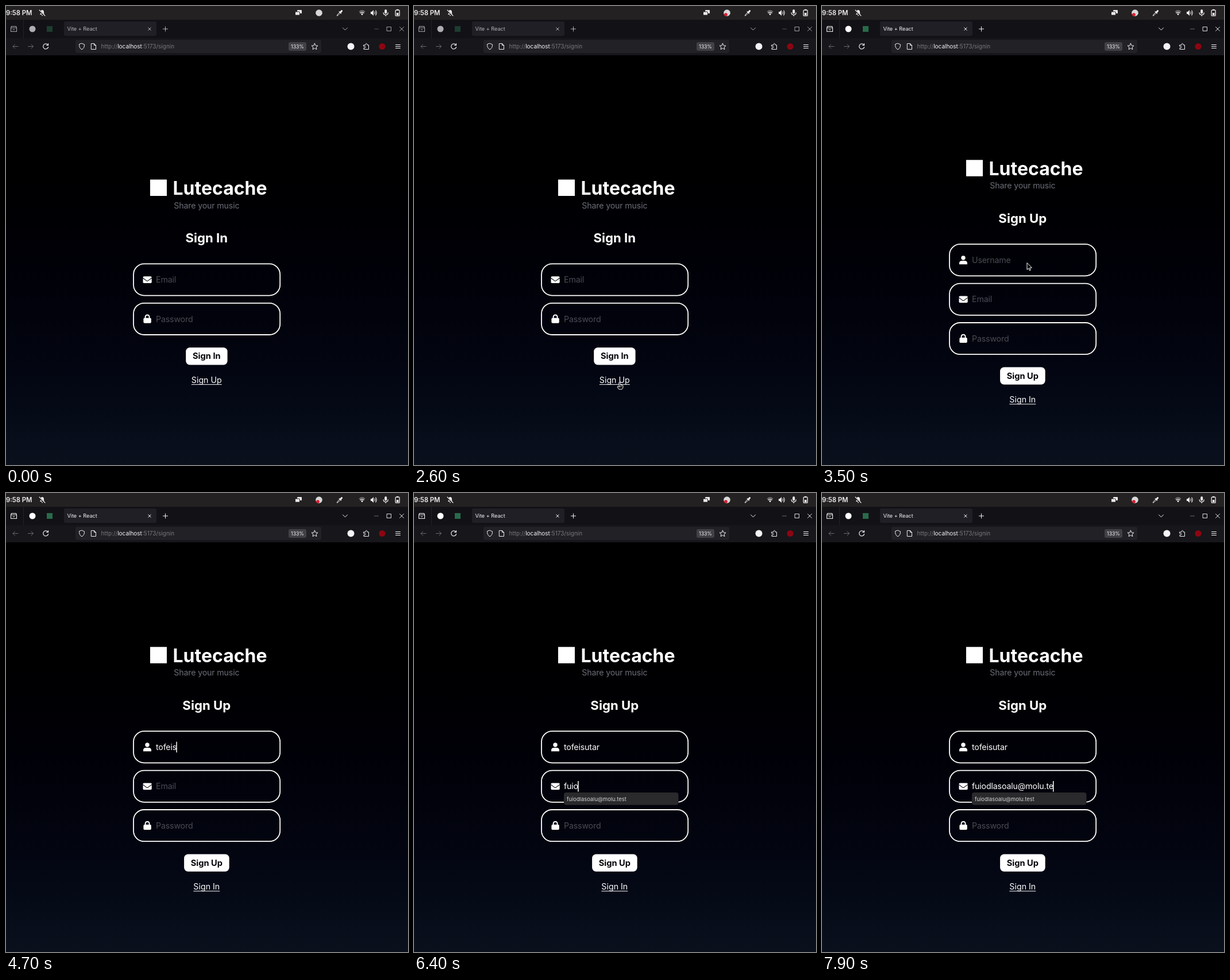
These frames come from a looping animation (700 by 800 pixels, 8000 ms). An HTML page with a canvas:

```html
<!DOCTYPE html>
<html lang="en">
<head>
<meta charset="utf-8">
<title>Sign up walkthrough</title>
<style>
  html, body { margin: 0; width: 100%; height: 100%; overflow: hidden; background: #000; }
  canvas { display: block; }
</style>
</head>
<body>
<canvas id="stage" width="700" height="800"></canvas>
<script>
const ctx = document.getElementById('stage').getContext('2d');
const LOOP = 8000, STEP = 100;
const FONT = 'Inter, "Noto Sans", sans-serif';
const WHITE = '#fff', HINT = '#4a4b54';
const BASE = 14.22, TIGHT = '-0.17px', FIELD_GAP = 68.4;

const BRAND = 'Lutecache';
const USERNAME = 'tofeisutar';
const EMAILS = ['fuiodlasoalu@molu.test', 'fotaunliubdes4718@molu.test'];

// [time, characters visible]
const NAME_KEYS = [[3800, 1], [3900, 2], [4000, 3], [4100, 4], [4300, 7], [4700, 6],
  [4800, 5], [4900, 7], [5100, 8], [5200, 9], [5300, 10]];
const EMAIL_KEYS = [[6100, 1], [6300, 2], [6400, 4], [6500, 5], [6700, 6], [6800, 7],
  [6900, 8], [7000, 9], [7100, 10], [7200, 12], [7300, 13], [7500, 14], [7600, 16],
  [7700, 17], [7800, 19], [7900, 20]];
// [time, x, y]
const POINTER_KEYS = [[600, 350, 671], [900, 325, 558], [1200, 311, 477.5], [1600, 311, 477.5],
  [1700, 311, 477], [1800, 311, 477], [2600, 358, 656], [2700, 358, 655],
  [3500, 357, 448], [3600, 356, 447]];

const clamp01 = v => Math.max(0, Math.min(1, v));
const smooth = v => v * v * (3 - 2 * v);

function rounded(x, y, w, h, r, fill, stroke, width = 1) {
  ctx.beginPath();
  ctx.roundRect(x, y, w, h, r);
  if (fill) { ctx.fillStyle = fill; ctx.fill(); }
  if (stroke) { ctx.strokeStyle = stroke; ctx.lineWidth = width; ctx.stroke(); }
}

function disc(x, y, r, fill) {
  rounded(x - r, y - r, 2 * r, 2 * r, r, fill);
}

function text(str, x, y, size, color, { weight = 400, align = 'left', tracking = '0px' } = {}) {
  ctx.font = `${weight} ${size}px ${FONT}`;
  ctx.letterSpacing = tracking;
  ctx.textAlign = align;
  ctx.fillStyle = color;
  ctx.fillText(str, x, y);
  return ctx.measureText(str).width;
}

// Draws an SVG path placed at x, y.
function icon(d, x, y, { fill, stroke, width = 1.1 } = {}) {
  const path = new Path2D(d);
  ctx.save();
  ctx.translate(x, y);
  ctx.lineCap = ctx.lineJoin = 'round';
  if (fill) { ctx.fillStyle = fill; ctx.fill(path); }
  if (stroke) { ctx.strokeStyle = stroke; ctx.lineWidth = width; ctx.stroke(path); }
  ctx.restore();
}

const outline = (d, x, y, stroke, width) => icon(d, x, y, { stroke, width });
const solid = (d, x, y, fill) => icon(d, x, y, { fill });

function typed(str, keys, t) {
  const passed = keys.filter(k => k[0] <= t);
  return passed.length ? str.slice(0, passed.at(-1)[1]) : '';
}

function systemBar(t) {
  ctx.fillStyle = '#232121';
  ctx.fillRect(0, 0, 700, 24);
  const c = '#efefef';
  text('9:58 PM', 0, 15.8, 11.3, c, { weight: 600 });
  solid('M-4 3 Q-3 2 -3 -1 Q-3 -5 0 -5 Q3 -5 3 -1 Q3 2 4 3 Z M-1.5 4 H1.5 Q0 6.5 -1.5 4 Z', 63, 12, c);
  outline('M-5 -5 L5 5', 62.5, 12.5, '#232121', 2.6);
  outline('M-5 -5 L5 5', 63, 12, c, 1.1);
  rounded(507, 7, 8, 6, 1, c);
  rounded(503.5, 10, 8, 6, 1, c, '#232121', 1);
  disc(545, 12, 5.8, '#d8d8d8');
  if (t >= 300) disc(543, 15, 2.8, '#e0182d');
  outline('M-4.5 4.8 L-3.8 2.8 L0 -1 L1.2 .2 L-2.6 4 Z', 581, 12, c, 1);
  outline('M-.6 -2.2 L2.4 .8', 581, 12, c, 1.5);
  outline('M1.8 -1.4 L3.6 -3.4', 581, 12, c, 3);
  outline('M-4.5 -2 Q0 -6 4.5 -2', 620, 12, '#888', 1.4);
  outline('M-3 0 Q0 -2.5 3 0', 620, 12, c, 1.6);
  solid('M-2 1.5 Q0 0 2 1.5 L0 4.5 Z', 620, 12, c);
  solid('M-6 -2 H-4 L-1 -5 V5 L-4 2 H-6 Z', 641, 12, c);
  outline('M1 -2 Q2.5 0 1 2 M2.8 -4 Q5.5 0 2.8 4', 641, 12, c, 1.2);
  rounded(659.2, 6, 4, 7.5, 2, c);
  outline('M-4 0 Q-4 4 0 4 Q4 4 4 0 M0 4 V6', 661.2, 11.5, c, 1.2);
  rounded(678.2, 7.2, 7, 10, 1.2, null, c, 1.3);
  rounded(680, 5.8, 3.5, 2, .5, c);
  rounded(680, 12, 3.5, 4, 0, c);
}

function tabStrip(t) {
  ctx.fillStyle = '#121116';
  ctx.fillRect(0, 24, 700, 32);
  ctx.fillStyle = '#24232a';
  ctx.fillRect(30, 24, 1, 32);
  rounded(101, 27, 161, 25, 3, '#201f25');

  // Window chrome brightens when it gains focus.
  const focus = clamp01((t - 2600) / 300);
  ctx.globalAlpha = .66 + .34 * focus;
  outline('M-4 -4.5 H4 L5 -2 H-5 Z M-5 -2 V4.5 H5 V-2 M-1.5 1.2 H1.5', 13.5, 40, '#f2f2f4');
  disc(46, 40, 5.5, WHITE);
  ctx.globalAlpha = .5 + .5 * focus;
  rounded(71, 35, 10, 10, 0, '#286b4b');
  ctx.globalAlpha = .7 + .3 * focus;
  text('Vite + React', 106.5, 43.4, 9.1, '#f5f5f7');
  outline('M-2.3 -2.3 L2.3 2.3 M2.3 -2.3 L-2.3 2.3', 250, 40, '#f5f5f7', 1);
  outline('M-4 0 H4 M0 -4 V4', 277.5, 40, '#f5f5f7', 1);
  outline('M-4 -2 L0 2 L4 -2', 590.5, 40, '#f5f5f7', 1);
  outline('M-3.5 0 H3.5', 645, 40, '#77777b', .9);
  outline('M-3.5 -3.5 H3.5 V3.5 H-3.5 Z', 667, 40, '#f5f5f7', .9);
  outline('M-3.5 -3.5 L3.5 3.5 M3.5 -3.5 L-3.5 3.5', 689, 40, '#f5f5f7', .9);
  ctx.globalAlpha = 1;
}

function toolbar() {
  ctx.fillStyle = '#16161b';
  ctx.fillRect(0, 56, 700, 30);
  rounded(121, 59, 428, 23, 3, '#222126');
  const c = '#f0f0f2', off = '#6a6a6e';
  outline('M4.5 0 H-4.5 M-1 -3.5 L-4.5 0 L-1 3.5', 16.5, 70.5, off, 1);
  outline('M-4.5 0 H4.5 M1 -3.5 L4.5 0 L1 3.5', 43, 70.5, off, 1);
  outline('M4 -2.5 A4.5 4.5 0 1 0 4.6 1 M4.5 -5 V-2 H1.5', 69, 70.5, c, 1.2);
  outline('M0 -5.3 L4.5 -3.5 Q4.8 3 0 5.3 Q-4.8 3 -4.5 -3.5 Z', 132, 70.5, c, 1);
  outline('M-3.8 -5 H1 L4 -2 V5 H-3.8 Z M1 -5 V-2 H4', 152.5, 70.5, c, 1);
  let x = 165.5;
  x += text('http://', x, 74, 10, '#77777c');
  x += text('localhost', x, 74, 10, '#f3f3f5');
  text(':5173/signin', x, 74, 10, '#77777c');
  rounded(492, 63, 31, 15, 3, '#424147');
  text('133%', 507.5, 73.7, 8.7, c, { align: 'center' });
  const star = Array.from({ length: 10 }, (_, i) => {
    const a = i * Math.PI / 5 - Math.PI / 2, r = i % 2 ? 2.7 : 5.8;
    return `${r * Math.cos(a)} ${r * Math.sin(a)}`;
  });
  outline(`M${star.join('L')}Z`, 537.5, 71, c, 1);
  disc(600.5, 70.5, 6, '#f4f4f6');
  outline('M-4.5 -2.5 H-1.5 V-4 Q0 -6.5 1.5 -4 V-2.5 H4 V5 H-4.5 V2.5 H-2.5 Q-.5 1 -2.5 -.3 H-4.5 Z', 627.5, 70.5, c, 1);
  disc(655, 70.5, 5.6, '#8c0611');
  outline('M-4 -3 H4 M-4 0 H4 M-4 3 H4', 682.5, 70.5, c, 1);
}

function pageBackground() {
  const g = ctx.createLinearGradient(0, 86, 0, 800);
  [[0, '#000'], [.3, '#000001'], [.5, '#000007'], [.72, '#02040f'], [.87, '#050a17'], [1, '#0a111d']]
    .forEach(([at, color]) => g.addColorStop(at, color));
  ctx.fillStyle = g;
  ctx.fillRect(0, 86, 700, 714);
}

const fieldIcons = {
  Username(y) {
    disc(246, y - 3.8, 3.7, WHITE);
    solid('M-7 7.5 V5.8 Q-7 1.2 -2.5 1.2 H2.5 Q7 1.2 7 5.8 V7.5 Z', 246, y, WHITE);
  },
  Email(y) {
    rounded(238.5, y - 5.7, 15.2, 11.8, 1.8, WHITE);
    outline('M-7.6 -2.8 L-1.2 1.9 Q0 2.7 1.2 1.9 L7.6 -2.8', 246, y, '#02030a', 1.1);
  },
  Password(y) {
    rounded(239.4, y - 1.6, 13.4, 9, 1.8, WHITE);
    outline('M-3.5 -1 V-3.4 A3.5 3.5 0 0 1 3.5 -3.4 V-1', 246.1, y, WHITE, 2);
  }
};

function field(label, y, value, focused) {
  rounded(222, y - 27.6, 255.2, 55.2, 18.5, null, WHITE, 1.8);
  fieldIcons[label](y);
  const width = text(value || label, 261, y + 5.2, BASE, value ? WHITE : HINT, { tracking: TIGHT });
  if (focused) {
    ctx.fillStyle = WHITE;
    ctx.fillRect(261 + (value ? width - .8 : 0), y - 9.2, 1.5, 18.6);
  }
}

function suggestions(prefix) {
  const rows = EMAILS.filter(e => e.startsWith(prefix));
  rounded(261, 522, 199.5, 7.4 + 14.4 * rows.length, 4, '#2a292b');
  rows.forEach((row, i) => text(row, 266, 536.7 + 14.4 * i, 9.4, '#d4d4d6'));
}

function form(t) {
  const signUp = t >= 2700;
  const [title, other] = signUp ? ['Sign Up', 'Sign In'] : ['Sign In', 'Sign Up'];
  const shift = signUp ? FIELD_GAP / 2 : 0;
  const top = -shift;

  ctx.fillStyle = WHITE;
  ctx.fillRect(251, 302.5 + top, 29, 28.5);
  text(BRAND, 290.5, 329 + top, 32, WHITE, { weight: 700 });
  text('Share your music', 349.3, 352.6 + top, BASE, '#6b6e78', { align: 'center', tracking: TIGHT });
  text(title, 349.3, 412.4 + top, 22.2, WHITE, { weight: 700, align: 'center' });

  const name = typed(USERNAME, NAME_KEYS, t);
  const email = typed(EMAILS[0], EMAIL_KEYS, t);
  const emailFocus = t >= 5400;
  const fields = signUp
    ? [['Username', name, t >= 3700 && !emailFocus], ['Email', email, emailFocus], ['Password', '', false]]
    : [['Email', '', false], ['Password', '', false]];
  fields.forEach(([label, value, focused], i) =>
    field(label, 477 + top + i * FIELD_GAP, value, focused));

  const buttonW = signUp ? 78.6 : 72.4;
  rounded(349.4 - buttonW / 2, 595.2 + shift, buttonW, 30.4, 7, WHITE);
  text(title, 349.3, 615.4 + shift, 14.65, '#05060a', { weight: 700, align: 'center' });
  const linkW = text(other, 349.3, 657.2 + shift, BASE, WHITE, { align: 'center' });
  ctx.fillStyle = WHITE;
  ctx.fillRect(349.3 - linkW / 2, 659.2 + shift, linkW, 1);

  if (t >= 5500) suggestions(email);
}

function pointerKind(t, y) {
  if (t >= 3600) return 'beam';
  if (t >= 2700) return 'arrow';
  if ((y > 449 && y < 505) || (y > 517 && y < 573)) return 'beam';
  if ((y > 595 && y < 626) || (y > 643 && y < 662)) return 'hand';
  return 'arrow';
}

function pointer(t) {
  if (t < POINTER_KEYS[0][0] || t >= 3700) return;
  const i = Math.max(1, POINTER_KEYS.findIndex(k => k[0] >= t));
  const [t0, x0, y0] = POINTER_KEYS[i - 1], [t1, x1, y1] = POINTER_KEYS[i];
  const k = smooth(clamp01((t - t0) / (t1 - t0)));
  const x = x0 + (x1 - x0) * k, y = y0 + (y1 - y0) * k;
  const kind = pointerKind(t, y);
  if (kind === 'beam') {
    const d = 'M-2 -5.5 H2 M0 -5.5 V5.5 M-2 5.5 H2';
    outline(d, x, y, '#000', 2.4);
    outline(d, x, y, WHITE, 1.3);
  } else if (kind === 'hand') {
    icon('M-1 0 Q0 -1 1 0 V4 L5 5 Q6 5.3 6 7 Q6 11 4 12 H-1 Q-3 10 -4 7.5 Q-3.5 6 -1 8 Z', x, y,
      { fill: '#000', stroke: WHITE, width: 1 });
    outline('M1 6 V8 M3 6 V8', x, y, WHITE, .7);
  } else {
    icon('M0 0 V11.5 L2.7 9.2 L4.4 13 L6.2 12.2 L4.6 8.5 L8 8.2 Z', x, y,
      { fill: '#000', stroke: WHITE, width: 1 });
  }
}

function draw(now) {
  const t = Math.floor(now % LOOP / STEP) * STEP;
  pageBackground();
  systemBar(t);
  tabStrip(t);
  toolbar();
  form(t);
  pointer(t);
}

const start = performance.now();
function frame() {
  draw(performance.now() - start);
  requestAnimationFrame(frame);
}
frame();
</script>
</body>
</html>
```
